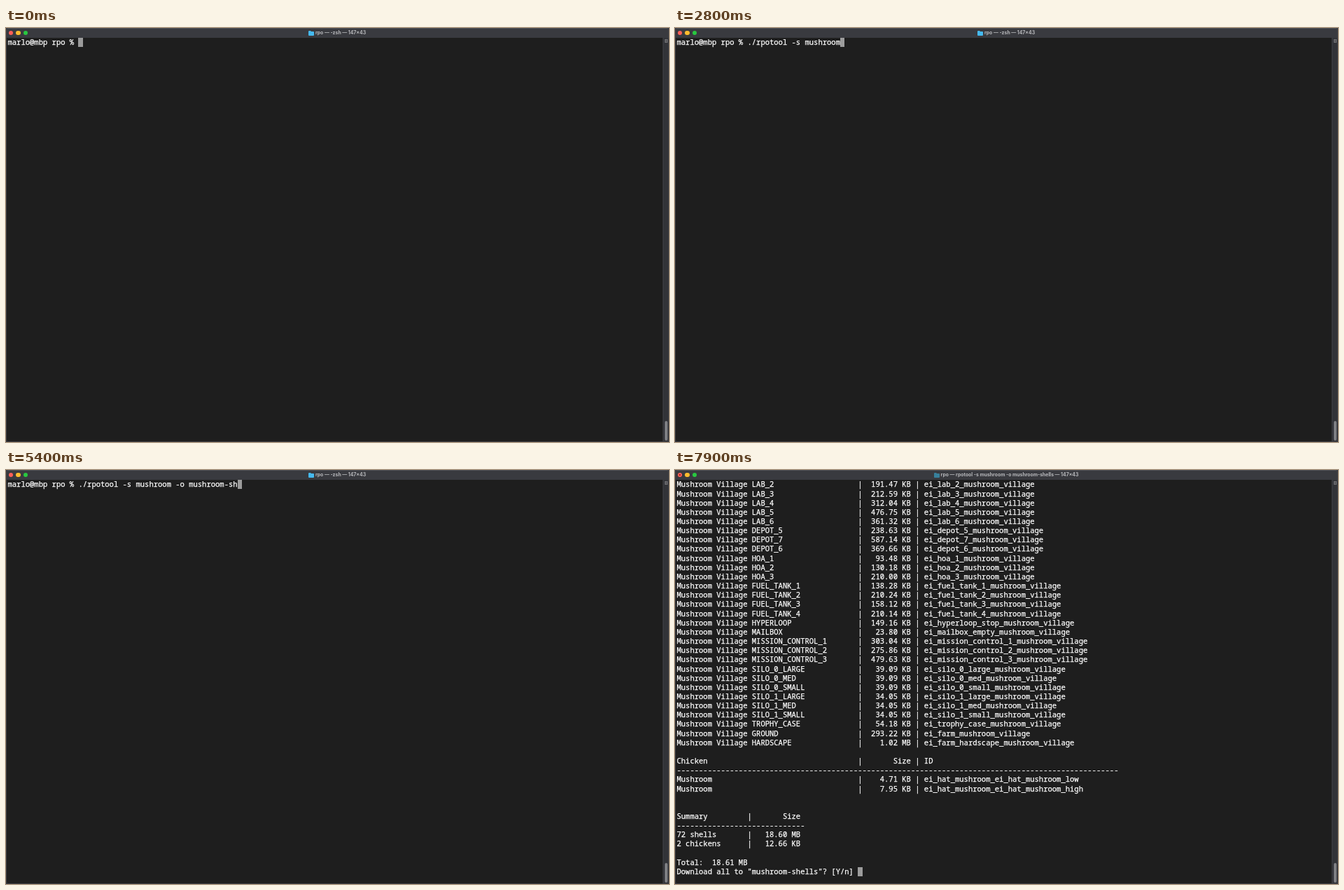
These frames come from a looping animation (947 by 591 pixels, 8 s). An HTML page:

```html
<!DOCTYPE html>
<html lang="en">
<head>
<meta charset="utf-8">
<title>Terminal</title>
<style>
html, body { margin: 0; width: 100%; height: 100%; overflow: hidden; background: #3c3e50; }
#win { position: absolute; left: 0; top: 0; width: 947px; height: 591px; overflow: hidden; background: #1e1e1e; border-radius: 3px; }
#win > * { position: absolute; }
#bar { left: 0; top: 0; width: 947px; height: 14px; background: #393a3f; }
#bar i { position: absolute; top: 3.6px; width: 6.6px; height: 6.6px; border-radius: 50%; }
#dot { position: absolute; left: 6.2px; top: 6.1px; width: 1.8px; height: 1.8px; border-radius: 50%; background: #7a1712; }
#title { position: absolute; left: 0; width: 946px; top: 0; height: 14px; display: flex; align-items: center; justify-content: center;
  font: 700 6.86px/14px Inter, sans-serif; color: #b9babd; white-space: pre; }
#title svg { width: 8px; height: 7px; margin-right: 2px; }
#screen { left: 2.5px; top: 14.4px; margin: 0; color: #fff; -webkit-text-stroke: .25px #fff;
  font: 500 10.53px/13.155px "Noto Sans Mono", "DejaVu Sans Mono", monospace; font-variant-ligatures: none; }
#cursor { width: 6.3px; height: 13px; background: #9c9c9c; }
.mark { top: 17px; width: 1px; height: 8px; border: 1px solid #777; box-sizing: border-box; }
#track { left: 938px; top: 14px; width: 9px; height: 577px; background: #323338; border-left: 1px solid #3e3e43; box-sizing: border-box; }
#thumb { left: 941px; top: 561px; width: 4px; height: 28px; border-radius: 2px; background: #7e7f83; }
#split { left: 941px; top: 16px; width: 4px; height: 5px; border: 1px solid #77777a; box-sizing: border-box; background: linear-gradient(#77777a 0 0) 0 50% / 100% 1px no-repeat; }
#edge { inset: 0; border: 1px solid #3e3e42; border-top-color: #505156; border-radius: 3px; box-sizing: border-box; }
</style>
</head>
<body>
<div id="win">
  <pre id="screen"></pre>
  <div id="cursor"></div>
  <div class="mark" style="left:1px"></div>
  <div class="mark" style="left:932px"></div>
  <div id="track"></div><div id="thumb"></div><div id="split"></div>
  <div id="bar">
    <i style="left:3.8px;background:#ff5f57"></i>
    <i style="left:14.3px;background:#febc2e"></i>
    <i style="left:24.9px;background:#28c840"></i>
    <b id="dot"></b>
    <div id="title"><svg viewBox="0 0 8 7"><path id="folder" d="M0 1q0-1 1-1h2l1 1h3q1 0 1 1v4q0 1-1 1H1q-1 0-1-1z"/></svg><span id="name"></span></div>
  </div>
  <div id="edge"></div>
</div>
<script>
const LOOP = 8000, RUN = 6100, OUTPUT = 6900;
const COL = 6.318, ROW = 13.155, LEFT = 2.4, TOP = 14.4;
const PROMPT = "marlo@mbp rpo % ";
const COMMAND = "./rpotool -s mushroom -o mushroom-shells";

// Time at which each character of the command appears.
const keys = [300, 300, 400, 600, 800, 900, 1000, 1100, 1200, 1400, 1500, 1700, 1700,
  1900, 2000, 2200, 2300, 2400, 2600, 2700, 2800, 2900, 3100, 3300, 3500,
  4000, 4100, 4300, 4400, 4500, 4600, 4700, 4800, 4900, 5300, 5400, 5500, 5600, 5800, 5900];

const shells = `LAB_2 191.47
LAB_3 212.59
LAB_4 312.04
LAB_5 476.75
LAB_6 361.32
DEPOT_5 238.63
DEPOT_7 587.14
DEPOT_6 369.66
HOA_1 93.48
HOA_2 130.18
HOA_3 210.00
FUEL_TANK_1 138.28
FUEL_TANK_2 210.24
FUEL_TANK_3 158.12
FUEL_TANK_4 210.14
HYPERLOOP 149.16 KB hyperloop_stop
MAILBOX 23.80 KB mailbox_empty
MISSION_CONTROL_1 303.04
MISSION_CONTROL_2 275.86
MISSION_CONTROL_3 479.63
SILO_0_LARGE 39.09
SILO_0_MED 39.09
SILO_0_SMALL 39.09
SILO_1_LARGE 34.05
SILO_1_MED 34.05
SILO_1_SMALL 34.05
TROPHY_CASE 54.18
GROUND 293.22 KB farm
HARDSCAPE 1.02 MB farm_hardscape`;

const row = (name, size, id) => `${name.padEnd(41)}|${size.padStart(11)} | ${id}`;
const sumRow = (name, size) => `${name.padEnd(16)}|${size.padStart(11)}`;
const shellRow = line => {
  const [type, size, unit = "KB", id = type.toLowerCase()] = line.split(" ");
  return row("Mushroom Village " + type, `${size} ${unit}`, `ei_${id}_mushroom_village`);
};

const output = [
  ...shells.split("\n").map(shellRow),
  "",
  row("Chicken", "Size", "ID"),
  "-".repeat(100),
  row("Mushroom", "4.71 KB", "ei_hat_mushroom_ei_hat_mushroom_low"),
  row("Mushroom", "7.95 KB", "ei_hat_mushroom_ei_hat_mushroom_high"),
  "", "",
  sumRow("Summary", "Size"),
  "-".repeat(29),
  sumRow("72 shells", "18.60 MB"),
  sumRow("2 chickens", "12.66 KB"),
  "",
  "Total:  18.61 MB",
  'Download all to "mushroom-shells"? [Y/n] '
].join("\n");

const $ = id => document.getElementById(id);
const marks = document.querySelectorAll(".mark");
let shown;

function draw(t) {
  const running = t >= RUN;
  const text = t >= OUTPUT ? output
    : PROMPT + COMMAND.slice(0, keys.filter(k => k <= t).length) + (running ? "\n" : "");
  if (text === shown) return;
  shown = text;
  const lines = text.split("\n");
  $("screen").textContent = text;
  $("cursor").style.left = LEFT + lines.at(-1).length * COL + "px";
  $("cursor").style.top = TOP + (lines.length - 1) * ROW + "px";
  $("name").textContent = `rpo — ${running ? COMMAND.slice(2) : "-zsh"} — 147×43`;
  $("folder").style.fill = running ? "#38809b" : "#45b9ee";
  $("dot").style.display = running ? "block" : "none";
  marks.forEach(m => m.style.display = running && t < OUTPUT ? "block" : "none");
}

function tick() {
  draw(performance.now() % LOOP);
  requestAnimationFrame(tick);
}
tick();
</script>
</body>
</html>
```
